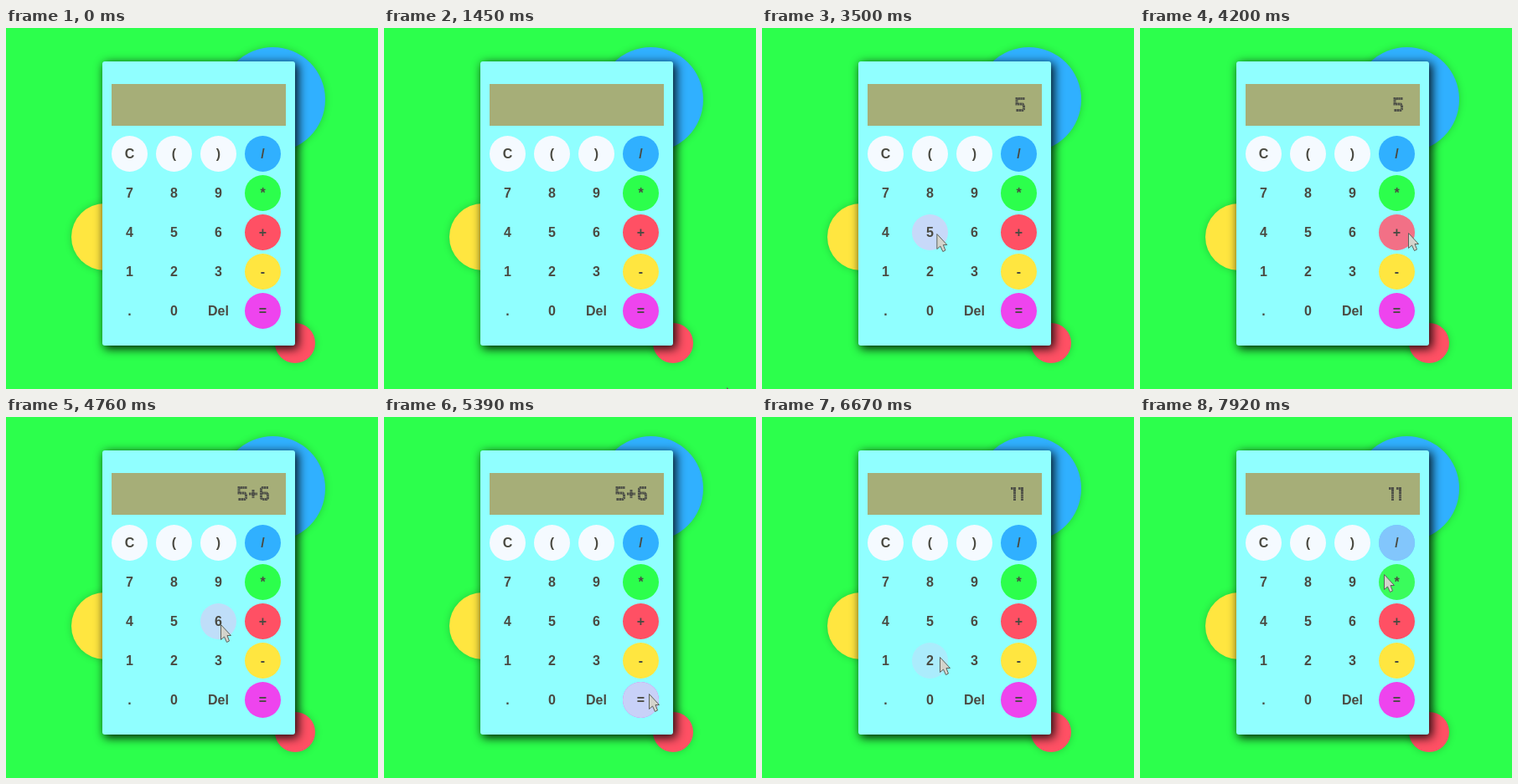
An HTML page for the animation above (7.99 s loop, 444 by 432 pixels).

```html
<!DOCTYPE html>
<html lang="en">
<head>
<meta charset="utf-8">
<title>Calculator</title>
<style>
  html, body { margin: 0; width: 100%; height: 100%; overflow: hidden; background: #2cff4c; }
  div, svg { position: absolute; }
  .disc { border-radius: 50%; box-shadow: 0 0 10px #0003; }
  .card { left: 115px; top: 40px; width: 230px; height: 340px; border-radius: 3px;
          background: #90ffff; box-shadow: 3px 3px 12px 1px #000d; }
  .lcd { left: 126px; top: 67px; width: 208px; height: 50px; background: #a6ae78; }
  .key { width: 43px; height: 43px; border-radius: 50%; color: #4a4a42; text-align: center;
         font: bold 16px/43px "Liberation Sans", Arial, sans-serif; }
  .glow { inset: 0; border-radius: 50%; background: #c7d9f9; opacity: 0; }
  .key span { position: relative; }
  svg { left: 0; top: 0; }
</style>
</head>
<body>
<script>
const LOOP = 7990, FADE = 220, STEP = 10;

function add(parent, cls, style = {}) {
  const el = document.createElement('div');
  el.className = cls;
  Object.assign(el.style, style);
  return parent.appendChild(el);
}

function disc(x, y, r, background) {
  add(document.body, 'disc', {
    left: x - r + 'px', top: y - r + 'px', width: 2 * r + 'px', height: 2 * r + 'px', background
  });
}

disc(318.5, 85, 62.5, '#30b0ff');
disc(118, 250, 40, '#ffe640');
disc(344.5, 376.5, 24, '#ff5064');
add(document.body, 'card');
add(document.body, 'lcd');

const fills = {
  'C': '#f5faff', '(': '#f5faff', ')': '#f5faff', '/': '#30b0ff',
  '*': '#2cff4c', '+': '#ff5064', '-': '#ffe640', '=': '#ee44ee'
};
const keys = 'C ( ) / 7 8 9 * 4 5 6 + 1 2 3 - . 0 Del ='.split(' ').map((label, i) => {
  const x = 126 + 53 * (i % 4), y = 129 + 47 * Math.floor(i / 4);
  const el = add(document.body, 'key', { left: x + 'px', top: y + 'px', background: fills[label] || 'none' });
  const glow = add(el, 'glow');
  el.appendChild(document.createElement('span')).textContent = label;
  return { x: x + 21.5, y: y + 21.5, glow, level: 0 };
});

document.body.insertAdjacentHTML('beforeend', `
  <svg width="444" height="432" viewBox="0 0 444 432">
    <path id="digits" fill="none" stroke="#4f5148" stroke-width="3" stroke-dasharray="2.4 .4"/>
    <path id="cursor" d="M.5 .5V18.5L4.5 15L7.5 21.5L10.5 20L8 13.5H12.5Z"
          fill="#d4d4cc" stroke="#5c625c" stroke-linejoin="round"/>
  </svg>`);
const digits = document.getElementById('digits');
const cursor = document.getElementById('cursor');

// Readout strokes, relative to the top left of each character
const glyphs = {
  5: 'm11.5 1.5h-9.5v6.5h7l1.5 1.5v4.5l-1.5 1.5h-8',
  6: 'm11 1.5h-7l-1.5 1.5v11l1.5 1.5h5l1.5 -1.5v-4.5l-1.5 -1.5h-6',
  '+': 'm1 9h10m-5 -5v10',
  1: 'm0 2.5h6m-1.5 -1.5v16'
};
const advance = c => c === '1' ? 9 : 13;

function showText(text) {
  let x = 315, d = '';
  for (const c of [...text].reverse()) {
    x -= advance(c);
    d += `M${x} 83${glyphs[c]}`;
  }
  digits.setAttribute('d', d);
}

const readouts = [[0, ''], [3500, '5'], [4410, '5+'], [4760, '5+6'], [5600, '11']];

// Pointer stops: x, y, arrival time, optional departure time
const stops = [
  [409, 430, 0, 1700],
  [310, 290, 2200],
  [294, 282, 2460],
  [243, 212, 2600],
  [205, 212, 2900],
  [208, 246, 3300, 3500],
  [346, 264, 3900, 4040],
  [320, 245, 4200, 4400],
  [256, 248, 4650, 4850],
  [304, 298, 5100],
  [316, 331, 5240, 6190],
  [212, 287, 6600, 6670],
  [203, 290, 6880, 7150],
  [338, 158, 7560],
  [314, 150, 7700, 7790],
  [290, 165, 7840],
  [291, 188, 7920]
];

function tipAt(t) {
  const i = stops.findLastIndex(s => s[2] <= t);
  const [x, y, arrive, leave = arrive] = stops[i];
  const [nextX, nextY, next] = stops[i + 1] || [x, y, LOOP];
  const k = Math.max(0, (t - leave) / (next - leave));
  return [x + (nextX - x) * k, y + (nextY - y) * k];
}

// Replays hovering from the loop start, so levels depend on time alone
function setHover(t) {
  for (const key of keys) key.level = 0;
  for (let s = 1700; s <= t; s += STEP) {
    const [x, y] = tipAt(s);
    for (const key of keys) {
      const over = Math.hypot(x - key.x, y - key.y) < 21.5;
      key.level = Math.min(1, Math.max(0, key.level + (over ? STEP : -STEP) / FADE));
    }
  }
  for (const key of keys) key.glow.style.opacity = key.level;
}

function draw(t) {
  setHover(t);
  cursor.setAttribute('transform', `translate(${tipAt(t)})`);
  cursor.setAttribute('visibility', t < 1450 ? 'hidden' : 'visible');
  showText(readouts.findLast(r => r[0] <= t)[1]);
}

const start = performance.now();
function tick() {
  draw((performance.now() - start) % LOOP);
  requestAnimationFrame(tick);
}
tick();
</script>
</body>
</html>
```
